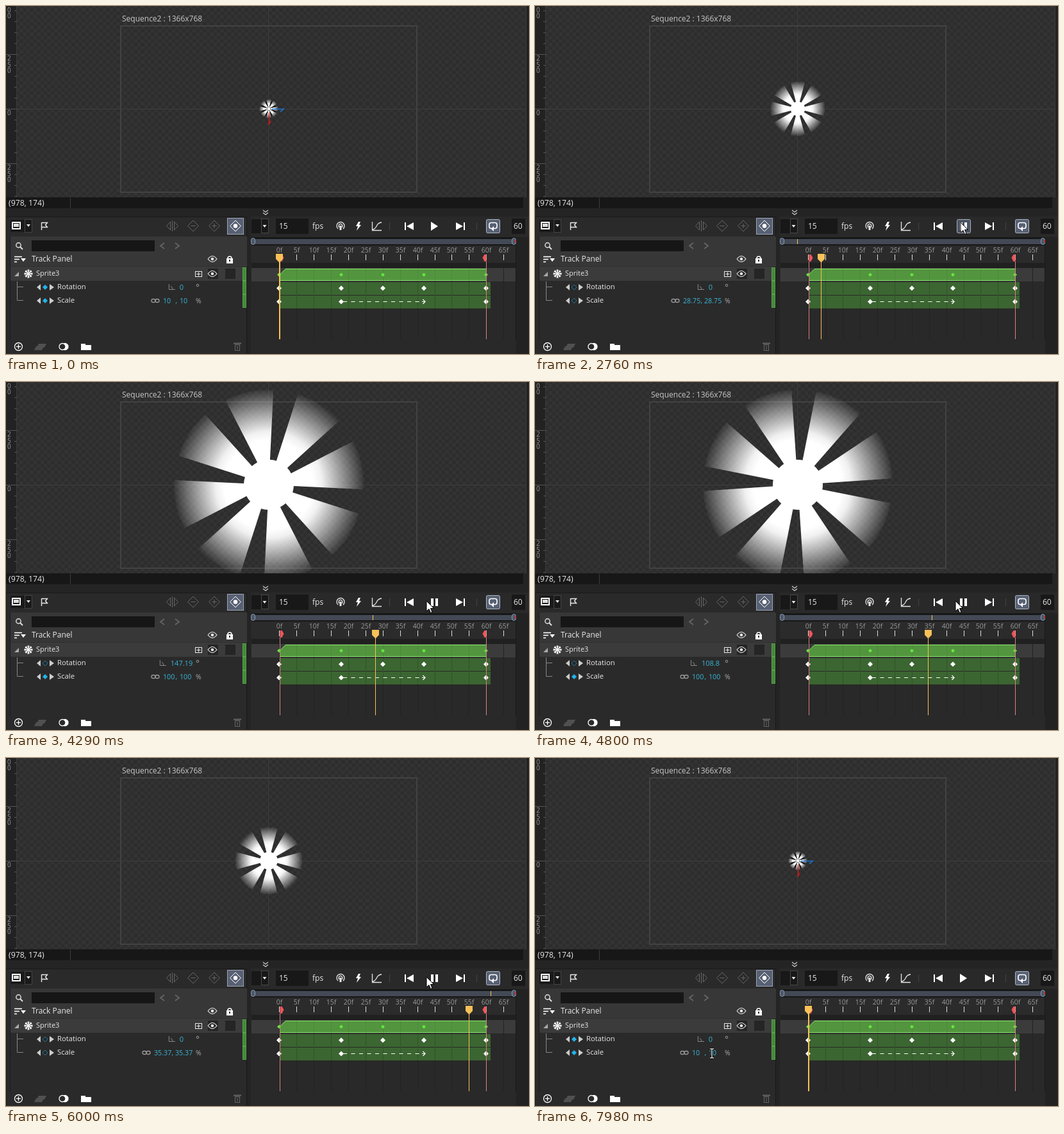
Write an HTML page with a canvas that moves like this. It is 816 px wide and 542 px high and loops after 8000 ms.

```html
<!DOCTYPE html>
<html>
<head>
<meta charset="utf-8">
<style>
html, body { margin: 0; width: 100%; height: 100%; overflow: hidden; background: #222; }
canvas { display: block; }
</style>
</head>
<body>
<canvas id="stage" width="816" height="542"></canvas>
<script>
const stage = document.getElementById('stage');
const view = stage.getContext('2d');
const back = document.createElement('canvas');
back.width = 816; back.height = 542;
let c = back.getContext('2d');
const TAU = Math.PI * 2;
const LIGHT = '#e8e8e8', DIM = '#666', CYAN = '#38b6d8', ORANGE = '#f8c158', RED = '#f0555a';

const rect = (x, y, w, h, col) => { c.fillStyle = col; c.fillRect(x, y, w, h); };
const frame = (x, y, w, h, col, lw = 1) => { c.strokeStyle = col; c.lineWidth = lw; c.strokeRect(x, y, w, h); };
function poly(pts, fill, stroke, lw = 1, open) {
  c.beginPath();
  for (let i = 0; i < pts.length; i += 2) c.lineTo(pts[i], pts[i + 1]);
  if (!open) c.closePath();
  if (fill) { c.fillStyle = fill; c.fill(); }
  if (stroke) { c.strokeStyle = stroke; c.lineWidth = lw; c.stroke(); }
}
const line = (pts, col, lw = 1) => poly(pts, null, col, lw, true);
const hline = (x, y, w, col, lw) => line([x, y, x + w, y], col, lw);
const vline = (x, y, h, col, lw) => line([x, y, x, y + h], col, lw);
const dia = (x, y, r, fill, stroke) => poly([x, y - r, x + r, y, x, y + r, x - r, y], fill, stroke);
const plus = (x, y, r, col, lw) => { hline(x - r, y, 2 * r, col, lw); vline(x, y - r, 2 * r, col, lw); };
// Sideways triangle with its tip at x + w
const side = (x, y, w, h, fill, stroke) => poly([x, y - h, x + w, y, x, y + h], fill, stroke);
const down = (x, y, r, col) => poly([x - r, y, x + r, y, x, y + r * 1.3], col);
const chevron = (x, y, w, h, col, lw) => line([x, y - h, x + w, y, x, y + h], col, lw);
function ring(x, y, r, fill, stroke, lw = 1, a = 0, b = TAU) {
  c.beginPath(); c.arc(x, y, r, a, b);
  if (fill) { c.fillStyle = fill; c.fill(); }
  if (stroke) { c.strokeStyle = stroke; c.lineWidth = lw; c.stroke(); }
}
function round(x, y, w, h, r, fill, stroke, lw = 1) {
  c.beginPath(); c.roundRect(x, y, w, h, r);
  if (fill) { c.fillStyle = fill; c.fill(); }
  if (stroke) { c.strokeStyle = stroke; c.lineWidth = lw; c.stroke(); }
}
function text(s, x, y, size = 12, col = LIGHT, align = 'left') {
  c.font = size + 'px "Open Sans", "Noto Sans", sans-serif';
  c.textAlign = align; c.fillStyle = col;
  c.fillText(s, x, y);
}
const frameX = f => Math.floor(426.7 + f * 5.385);

// Eight 30 degree petals around a solid disc
function star(x, y, inner, outer, turn, fill) {
  const d = TAU / 24;
  c.beginPath();
  for (let i = 0; i < 8; i++) {
    const a = i * TAU / 8 - turn * TAU / 360;
    c.arc(x, y, outer, a - d, a + d);
    c.arc(x, y, inner, a + d, a + TAU / 8 - d);
  }
  c.closePath(); c.fillStyle = fill; c.fill();
}

function eye(x, y) {
  c.beginPath();
  c.moveTo(x - 7, y); c.quadraticCurveTo(x, y - 9, x + 7, y); c.quadraticCurveTo(x, y + 9, x - 7, y);
  c.strokeStyle = LIGHT; c.lineWidth = 1.2; c.stroke();
  ring(x, y, 2.3, LIGHT);
}

function drawCanvasArea() {
  rect(0, 0, 816, 542, '#242424');
  rect(17, 0, 794, 298, '#2d2d2d');
  const size = 5.4, snapX = i => Math.round(410 + i * size), snapY = j => Math.round(160 + j * size);
  for (let j = -30; j < 26; j++) for (let i = -73; i < 75; i++)
    if ((i + j) & 1) rect(snapX(i), snapY(j), snapX(i + 1) - snapX(i), snapY(j + 1) - snapY(j), '#333');
  for (const [x, w] of [[0, 17], [811, 5]]) rect(x, 0, w, 298, '#222');
  for (const x of [16.5, 811.5]) vline(x, 0, 298, '#3a3a3a');
  hline(17, 160.5, 794, '#3d3d3d');
  vline(409.5, 0, 298, '#3b3b3b');
  frame(179, 31, 462, 259, '#424242', 2);
  text('Sequence2 : 1366x768', 181, 24, 12, '#c8c8c8');
  for (let k = -10; k < 9; k++) {
    const y = Math.round(160 + k * 17), major = k % 5 === 0;
    hline(major ? 0 : 13, y + .5, major ? 17 : 4, '#555');
    if (major) [...String(Math.abs(k * 50))].forEach((n, i) => text(n, 2, y + 10 + i * 9.6, 10, '#999'));
  }
  rect(0, 298, 816, 244, '#242424');
  rect(0, 298, 807, 17, '#171717');
  text('(978, 174)', 4, 311, 12.3);
  vline(100.5, 299, 16, '#3c3c3c');
  for (const y of [318, 322]) line([401, y, 405, y + 3, 409, y], '#ccc', 1.2);
}

function drawToolbar() {
  rect(7, 333, 34, 19, '#1a1a1a');
  frame(29.5, 332.5, 11, 20, '#444');
  frame(10, 337, 12, 10, '#fff', 2);
  rect(12, 339, 8, 5, '#ddd');
  down(35, 340, 3, LIGHT);
  vline(55.5, 337, 12, LIGHT, 1.4);
  line([55.5, 337.5, 64.5, 337.5, 61.5, 341, 64.5, 344.5, 55.5, 344.5], LIGHT, 1.4);
  for (const d of [-1, 1]) side(259.5 + d * 3, 342.5, d * 6, 6.5, null, DIM);
  vline(259.5, 334, 17, DIM);
  for (const x of [292, 325]) dia(x, 342.5, 8.5, null, DIM);
  hline(288.5, 342.5, 7, DIM);
  plus(325, 342.5, 3.5, DIM);
  rect(345, 330, 26, 26, '#586173');
  frame(345.5, 330.5, 25, 25, '#9ba5b7');
  dia(358, 342.5, 8.5, null, '#fff');
  ring(358, 342.5, 3.2, '#fff');
}

function drawTrackPanel() {
  rect(0, 328, 376, 214, '#2a2a2a');
  frame(.5, 328.5, 375, 214, '#191919');
  rect(7, 359, 369, 47, '#373737');
  rect(7, 406, 362, 22, '#3b3b3b');
  vline(6.5, 359, 161, '#1d1d1d');
  hline(7, 405.5, 362, '#303030');
  drawToolbar();

  ring(19.5, 372.5, 3.7, null, LIGHT, 1.4);
  line([22, 375, 26, 379], LIGHT, 1.8);
  rect(40, 365, 192, 17, '#161616');
  chevron(247, 373.5, -6, 4.5, DIM, 1.8);
  chevron(264, 373.5, 6, 4.5, DIM, 1.8);
  for (let i = 0; i < 3; i++) hline(13, 390.5 + i * 4, 12 - i * 4, '#fff', 1.6);
  down(27, 393, 4, '#fff');
  text('Track Panel', 40, 398);
  eye(322, 394);
  rect(344, 393, 10, 8, '#fff');
  ring(349, 393, 3, null, '#fff', 1.6, Math.PI, TAU);
  rect(348, 395, 2, 3, '#333');

  poly([13, 421, 20, 421, 20, 414], '#aaa');
  star(35, 417, 2, 6.5, 0, '#fff');
  text('Sprite3', 47, 420, 11);
  frame(295.5, 413.5, 10, 8, LIGHT);
  plus(300.5, 417.5, 3, LIGHT);
  for (const x of [315, 342]) rect(x, 409, 16, 16, '#252525');
  eye(322, 417);
  line([17.5, 429, 17.5, 458.5, 27, 458.5], '#888');
  hline(17, 437.5, 10, '#888');
  ['Rotation', 'Scale'].forEach((name, i) => {
    const y = 438 + i * 21;
    text(name, 80, y + 3, 11.3);
    side(54, y, -6, 5, '#ccc');
    side(68, y, 7, 5, '#ccc');
  });
  ring(299, 435, 1.8, null, '#999');
  text('%', 296, 463, 10.5, '#aaa');
  for (let i = 0; i < 3; i++) {
    rect(369, 407 + i * 21, 6, 21, '#44883a');
    frame(369.5, 407.5 + i * 21, 5, 20, '#56a548');
  }

  ring(19.5, 530.5, 6, null, '#fff', 1.3);
  plus(19.5, 530.5, 3.5, '#fff', 1.3);
  for (const d of [0, 4]) poly([51 - d, 526 + d, 63 - d, 526 + d, 60 - d, 532 + d, 48 - d, 532 + d], '#505050');
  ring(92, 530.5, 5, '#fff', '#fff', 1.3);
  ring(88, 530.5, 5, '#2a2a2a', '#fff', 1.3);
  rect(117, 526, 7, 3, '#fff');
  rect(117, 528, 16, 8, '#fff');
  frame(357.5, 527.5, 7, 9, DIM);
  hline(355, 525.5, 12, DIM, 2);
  vline(361, 529, 6, DIM);
}

function drawTimeline() {
  rect(382, 328, 434, 214, '#292929');
  rect(383, 332, 26, 22, '#181818');
  frame(398.5, 331.5, 11, 22, '#484848');
  down(403.5, 341, 3, LIGHT);
  rect(421, 331, 51, 24, '#181818');
  text('15', 426, 347);
  text('fps', 478, 347);
  for (const r of [3, 6]) ring(522, 342.5, r, null, LIGHT, 1.3, 2.3, TAU + .85);
  rect(520.5, 342, 3, 7, LIGHT);
  poly([550, 336, 553, 336, 551, 341, 554, 341, 547, 350, 549, 343, 546, 343], '#fff');
  line([571.5, 336, 571.5, 349.5, 586, 349.5], LIGHT, 1.3);
  c.beginPath(); c.moveTo(572, 348); c.bezierCurveTo(580, 347, 576, 338, 586, 337); c.stroke();
  for (const x of [598.5, 734.5]) vline(x, 337, 12, '#444');
  round(749.5, 332.5, 21, 21, 2, '#586173', '#aeb7c6');
  round(754, 337.5, 12, 9, 3, null, '#fff', 1.6);
  side(761, 347, -4, 4, '#fff');
  rect(789, 331, 21, 24, '#181818');
  text('60', 792, 347);

  rect(383, 360, 413, 13, '#171717');
  rect(388, 363, 402, 8, '#434a55');
  rect(383, 373, 413, 27, '#2b2b2b');
  rect(383, 400, 413, 8, '#202020');
  rect(383, 408, 413, 21, '#3b3b3b');
  rect(796, 360, 20, 182, '#222');
  vline(795.5, 360, 159, '#181818');
  for (let f = 0; f <= 65; f += 5) {
    const x = frameX(f) + .5;
    text(f + 'f', x, 383.5, 10.5, '#999', 'center');
    vline(x, 387, 9, '#ddd');
    vline(x, 408, 111, '#232323');
  }
  for (const y of [430, 451]) rect(427, y, 329, 20, '#3b6531');
  poly([427.5, 427.5, 427.5, 418, 436, 409.5, 749.5, 409.5, 749.5, 427.5], '#53953f', '#82e466');
  for (let f = 5; f < 60; f += 5) {
    const x = frameX(f) + .5;
    vline(x, 410, 17, '#4a8a38');
    vline(x, 430, 41, '#315529');
  }
  for (const f of [0, 18, 30, 42, 60]) {
    const x = frameX(f);
    dia(x, 418.5, 3, '#62e83d');
    dia(x, 439.5, 4, '#fff');
    if (f < 30 || f > 50) dia(x, 460.5, 4, '#fff');
  }
  c.setLineDash([6, 6.5]); hline(526, 460.5, 122, '#fff'); c.setLineDash([]);
  hline(649, 460.5, 5, '#fff');
  chevron(650.5, 460.5, 3.5, 3.5, '#fff', 1.3);
  for (const d of [1, -1]) {
    const x = d > 0 ? 427.5 : 749.5;
    vline(x, 398, 121, '#d58282');
    poly([x, 387, x + d * 3, 387, x + d * 6, 392, x + d * 3, 398, x, 398], RED);
  }
}

const mix = (a, b, k) => a + (b - a) * k;

// Timeline position: a few [time, frame] points, joined and extended by straight lines
const PLAY = [[2760, 3.75], [3480, 14.93], [4290, 27.8127], [5370, 44.454], [6720, 66.894]];
function playFrame(t) {
  let i = 0;
  while (i < PLAY.length - 2 && t >= PLAY[i + 1][0]) i++;
  const [t0, f0] = PLAY[i], [t1, f1] = PLAY[i + 1];
  return mix(f0, f1, (t - t0) / (t1 - t0)) % 60;
}
const scaleAt = f => 10 + 90 * Math.min(1, f / 18, (60 - f) / 18);
const turnAt = f => 180 * Math.max(0, 1 - Math.abs(f - 30) / 12);

// Pointer glides: from, until, x, y
const GLIDES = [[1500, 2310, 664, 337], [2850, 3030, 656, 341], [6310, 6580, 630, 341],
  [7110, 7560, 432, 479], [7620, 7980, 276, 460]];
function mouseAt(t) {
  let x = 445, y = 508;
  for (const [from, until, toX, toY] of GLIDES) {
    const k = Math.min(1, Math.max(0, (t - from) / (until - from))), e = k * k * (3 - 2 * k);
    x = mix(x, toX, e); y = mix(y, toY, e);
  }
  return [x, y];
}

function drawSprite(scale, turn, playing) {
  c.save();
  c.beginPath(); c.rect(17, 0, 794, 298); c.clip();
  const R = scale * 1.48, g = c.createRadialGradient(410, 160, 0, 410, 160, R);
  [[.47, 1], [.56, .93], [1, .04]].forEach(([p, a]) => g.addColorStop(p, `rgba(255,255,255,${a})`));
  if (!playing) ring(410, 160, 11, '#111');
  star(410, 160, scale * .39, R, turn, g);
  if (!playing) {
    ring(410, 160, 3, '#fff', '#777');
    line([415, 160.5, 433, 160.5, 428, 165], '#1976d2', 1.6);
    line([410.5, 166, 410.5, 184, 413, 179], '#d01818', 1.4);
  }
  c.restore();
}

function drawValues(f, scale, turn) {
  const key = Math.floor(f), held = key >= 18 && key <= 42;
  const mark = (y, on) => dia(61, y, 4, on ? '#1fb4ee' : '#1d2b30', on ? null : '#2d7285');
  mark(438, key === 0 || held && key % 12 === 6);
  mark(459, key === 0 || held);
  const r = String(+turn.toFixed(2)), s = String(+scale.toFixed(2));
  text(r, 274, 442, 11, CYAN, 'center');
  const ax = 262 - c.measureText(r).width / 2;
  line([ax - 4.5, 433, ax - 4.5, 441.5, ax + 5, 441.5], '#888');
  ring(ax - 4, 441, 5, null, '#888', 1, -1.2, 0);
  const long = s.length > 3, x = long ? 231 : 245;
  text(s, x, 463, 10.7, CYAN);
  text(',', long ? 258.5 : 264.5, 463, 10.7, CYAN);
  text(s, long ? 264 : 271, 463, 10.7, CYAN);
  for (const d of [-3, 3]) round(x - 15 + d, 456.5, 6, 5, 2.5, null, '#999', 1.3);
}

function drawTransport(playing, mx, my) {
  for (const x of [629, 669])
    if (Math.abs(mx - x) <= 11 && Math.abs(my - 343) <= 11)
      round(x - 10.5, 332.5, 21, 21, 2, '#4b5362', '#a9b1bf');
  for (const d of [-1, 1]) {
    const x = 669 + d * 40;
    side(x - d * 7, 343, d * 11, 6, '#fff');
    rect(x + d * 6 - 1, 337, 2, 12, '#fff');
  }
  if (playing) for (const x of [663, 670]) rect(x, 337, 4, 12, '#fff');
  else side(663, 343, 11, 7, '#fff');
}

function drawPlayhead(f, playing) {
  if (playing) rect(Math.floor(383.5 + f * 6.8), 363, 1, 8, ORANGE);
  for (const x of [382.5, 789.5]) round(x, 361.5, 6, 10, 3, '#4d586a', '#8b9bb3');
  rect(794, 364, 2, 4, '#c33');
  const x = frameX(f);
  rect(x, 398, playing ? 1 : 2, 121, ORANGE);
  poly([x - 5, 386, x + 6, 386, x + 6, 394, x + 1, 399, x, 399, x - 5, 394], ORANGE);
}

function drawBeam(x, y) {
  for (const [col, w] of [['#000', 3], ['#fff', 1.2]]) {
    vline(x, y - 7, 14, col, w);
    for (const d of [-7, 7]) hline(x - 3, y + d, 6, col, w);
  }
}
function drawArrow(x, y) {
  const tip = [0, 0, 0, 16, 4, 12.5, 6.5, 18.5, 9, 17.5, 6.5, 11.5, 11.5, 11.5];
  poly(tip.map((v, i) => v + (i % 2 ? y : x)), '#fff', '#000');
}

function draw(now) {
  const t = Math.floor((now % 8000 - 60) / 90) * 90 + 60;
  const playing = t >= 2580 && t < 7110;
  const f = playing ? playFrame(t) : 0;
  const scale = scaleAt(f), turn = turnAt(f), [mx, my] = mouseAt(t);
  c.drawImage(back, 0, 0);
  drawSprite(scale, turn, playing);
  drawValues(f, scale, turn);
  drawTransport(playing, mx, my);
  drawPlayhead(f, playing);
  if (t >= 1500) (mx < 300 ? drawBeam : drawArrow)(mx, my);
}

drawCanvasArea();
drawTrackPanel();
drawTimeline();
c = view;
const start = performance.now();
function tick() {
  draw(performance.now() - start);
  requestAnimationFrame(tick);
}
tick();
</script>
</body>
</html>
```
